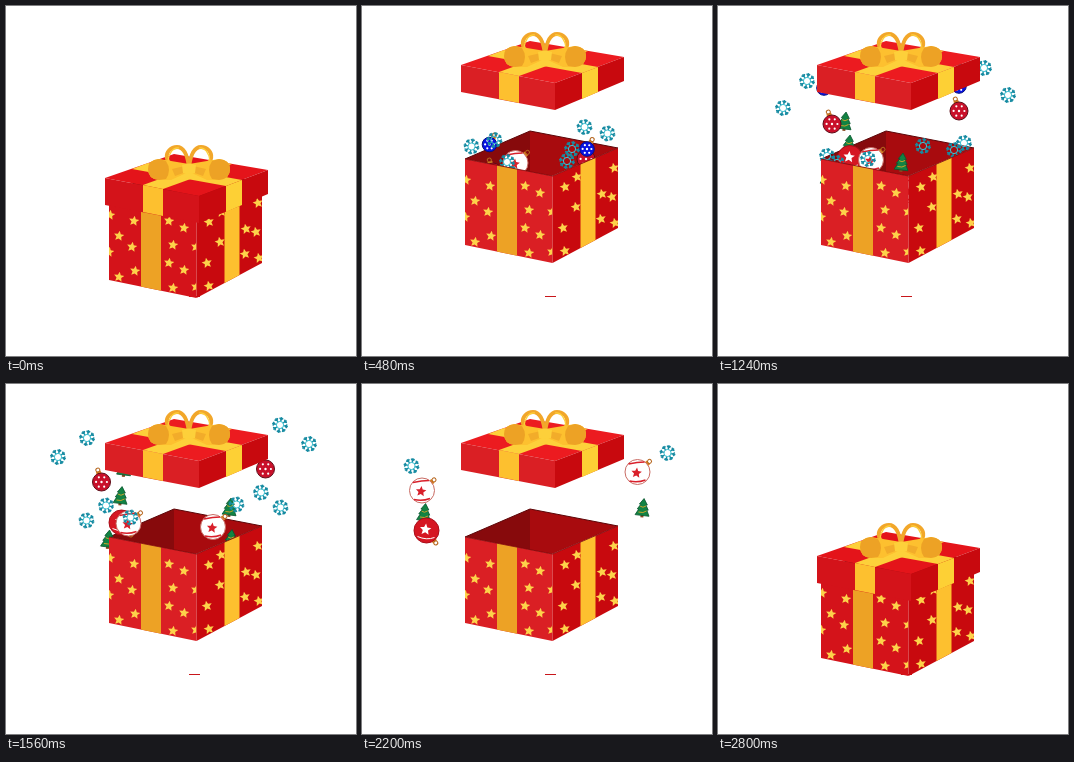
Animation, 350 px wide and 350 px high, one loop 2.84 s. Source, as an HTML page with a canvas:

```html
<!DOCTYPE html>
<html>
<head>
<meta charset="utf-8">
<style>
html, body { margin: 0; width: 350px; height: 350px; overflow: hidden; background: #fff; }
canvas { display: block; }
</style>
</head>
<body>
<canvas id="stage" width="350" height="350"></canvas>
<script>
const ctx = document.getElementById('stage').getContext('2d');
const LOOP = 2840, STEP = 40;
const KEYS = [200, 760, 1240, 1880, 2520];
const GOLD = '#eda225', YELLOW = '#fdc02f', BRIGHT = '#fdd03a';
const clamp = v => Math.max(0, Math.min(1, v));

function poly(color, ...p) {
  ctx.fillStyle = color;
  ctx.beginPath();
  for (let i = 0; i < p.length; i += 2) ctx.lineTo(p[i], p[i + 1]);
  ctx.closePath();
  ctx.fill();
}

function path(d, fill, stroke, width = 1) {
  const p = new Path2D(d);
  if (fill) { ctx.fillStyle = fill; ctx.fill(p); }
  if (stroke) { ctx.strokeStyle = stroke; ctx.lineWidth = width; ctx.stroke(p); }
}

function disc(x, y, r, fill, stroke) {
  ctx.beginPath();
  ctx.arc(x, y, r, 0, 7);
  if (fill) { ctx.fillStyle = fill; ctx.fill(); }
  if (stroke) { ctx.strokeStyle = stroke; ctx.lineWidth = 1; ctx.stroke(); }
}

function star(x, y, r, color, tilt = 0.1) {
  const p = [];
  for (let i = 0; i < 10; i++) {
    const a = i * Math.PI / 5 - Math.PI / 2 + tilt, q = i % 2 ? r * 0.46 : r;
    p.push(x + q * Math.cos(a), y + q * Math.sin(a));
  }
  poly(color, ...p);
}

function cap(r, angle) {
  ctx.save();
  ctx.rotate(angle);
  ctx.fillStyle = '#d98324';
  ctx.fillRect(-2.5, -r - 2, 5, 3);
  disc(0, -r - 3.5, 2, null, '#b5651d');
  ctx.restore();
}

function dottedBall(r, color, edge, angle) {
  cap(r, angle);
  disc(0, 0, r, color, edge);
  for (let i = 0; i < 6; i++) {
    disc(r * 0.6 * Math.cos(i * 1.05), r * 0.6 * Math.sin(i * 1.05), 1.1, '#fff');
  }
  disc(0, 0, 1.2, '#fff');
}

const ornaments = {
  flake() {
    ctx.strokeStyle = '#168ba2';
    ctx.lineWidth = 1.4;
    ctx.beginPath();
    for (let i = 0; i < 8; i++) {
      const a = i * Math.PI / 4 + 0.2;
      const at = (r, d = 0) => [r * Math.cos(a + d), r * Math.sin(a + d)];
      ctx.moveTo(...at(3.2));
      ctx.lineTo(...at(8));
      ctx.moveTo(...at(7.4, -0.25));
      ctx.lineTo(...at(5.4));
      ctx.lineTo(...at(7.4, 0.25));
    }
    ctx.stroke();
    disc(0, 0, 3.6, null, '#43c3d3');
  },
  blue() { dottedBall(7.3, '#0812e2', '#06107e', 0.5); },
  red() { dottedBall(9, '#c9102a', '#5d0d18', -0.3); },
  white() {
    cap(12.5, 0.85);
    disc(0, 0, 12.5, '#fff', '#c96b63');
    path('M-9 -8 Q0 -10 7 -10 M-8 9 Q0 11 8 8', null, '#d9202b', 1.4);
    star(-1, 1, 5.5, '#d9202b');
  },
  starred() {
    cap(12, 2.5);
    disc(0, 0, 12.5, '#d51622', '#a90c18');
    star(-1, -1, 6, '#fff');
    path('M-9 6 Q0 10 8 7', null, '#fff', 1);
  },
  tree() {
    ctx.rotate(0.12);
    ctx.fillStyle = '#8b4a22';
    ctx.fillRect(-1.5, 7, 3, 3);
    path('M0 -9 L4 -3 L2.5 -3 L5.5 2 L4 2 L7 8 L-7 8 L-4 2 L-5.5 2 L-2.5 -3 L-4 -3Z', '#118343', '#0b5730', 0.8);
    path('M-3 -1 Q0 1 3 -2 M-4 5 Q1 6 4 3', null, '#d5a52b', 0.9);
  }
};

// kind, mirrored, first key, then x and y at successive keys
const flights = [
  ['tree', 0, 1, 135, 165, 127, 115, 110, 51],
  ['tree', 0, 2, 131, 138, 99, 85],
  ['tree', 0, 2, 110, 170, 95, 140, 30, 117],
  ['tree', 0, 2, 184, 156, 264, 90],
  ['tree', 0, 2, 205, 176, 245, 133, 317, 114],
  ['starred', 0, 2, 132, 152, 99, 125, 30, 168],
  ['red', 1, 1, 131, 151, 114, 118, 77, 78],
  ['white', 0, 0, 154, 160, 153, 154, 153, 154, 92, 125, 28, 88],
  ['white', 0, 2, 190, 184, 224, 102, 327, 74],
  ['blue', 0, 0, 139, 159, 116, 118, 106, 82],
  ['blue', 0, 1, 225, 128, 241, 80],
  ['flake', 1, 0, 123, 159, 96, 122, 65, 102, 39, 44],
  ['flake', 1, 0, 144, 160, 121, 108, 89, 75, 73, 33],
  ['flake', 1, 1, 145, 141, 118, 74],
  ['flake', 1, 1, 150, 153, 150, 153, 99, 114],
  ['flake', 1, 2, 119, 157, 81, 86],
  ['flake', 1, 2, 109, 150, 52, 123, 47, 41]
];

function drawFlight([kind, mirrored, first, ...xy], t) {
  if (first) {
    xy.unshift(xy[0], xy[1] + 30);
    first--;
  }
  const count = xy.length / 2, last = KEYS[first + count - 1];
  const alpha = 1 - clamp((t - last) / 180);
  if (t < (first ? KEYS[first] : STEP) || alpha <= 0) return;
  let i = 0;
  while (i < count - 2 && t > KEYS[first + i + 1]) i++;
  const from = KEYS[first + i];
  const u = Math.max(0, (t - from) / (KEYS[first + i + 1] - from));
  const x = xy[2 * i] + u * (xy[2 * i + 2] - xy[2 * i]);
  const y = xy[2 * i + 1] + u * (xy[2 * i + 3] - xy[2 * i + 1]) + Math.max(0, 200 - t) * 0.175;
  const place = (px, py) => {
    ctx.save();
    ctx.globalAlpha = alpha;
    ctx.translate(px, py);
    ornaments[kind]();
    ctx.restore();
  };
  place(x, y);
  if (mirrored) place(355 - x, y - 13);
}

const frontStars = [104, 174, 128, 180, 113, 195, 103, 211, 126, 206, 113, 236, 129, 230,
  163, 180, 178, 187, 167, 204, 190, 206, 178, 229, 163, 222, 167, 247, 190, 246];
const sideStars = [203, 181, 215, 171, 201, 222, 214, 201, 203, 245, 240, 188, 252, 162,
  250, 191, 239, 213, 253, 217];

function drawStars(list, tilt) {
  for (let i = 0; i < list.length; i += 2) star(list[i], list[i + 1], 5.4, '#fdd24a', tilt);
}

function face(color, corners, ribbon, ribbonColor, stars, tilt) {
  ctx.save();
  poly(color, ...corners);
  ctx.clip();
  drawStars(stars, tilt);
  poly(ribbonColor, ...ribbon);
  ctx.restore();
}

function drawInside() {
  poly('#870a0c', 103, 153, 168, 125, 168, 166);
  poly('#a80b0e', 168, 125, 256, 142, 190, 170, 168, 166);
  path('M103 153 L168 125 L256 142', null, '#5c0608');
}

function drawFront(open) {
  face(open ? '#da1f24' : '#d4131a', [103, 153, 190.5, 170, 190.5, 257, 103, 239],
    [135, 150, 155, 150, 155, 260, 135, 260], GOLD, frontStars, 0.15);
  face('#c8090e', [190.5, 170, 256, 142, 256, 222, 190.5, 257],
    [218.5, 140, 233.5, 140, 233.5, 250, 218.5, 250], YELLOW, sideStars, -0.2);
  if (open) path('M103 153 L190.5 170 L256 142', null, '#7d080b', 0.8);
}

function drawBow() {
  for (const side of [1, -1]) {
    ctx.save();
    ctx.translate(183, 0);
    ctx.scale(side, 1);
    path('M-1 50 C-30 49 -25 28 -12 28 C-4 28 -1 40 0 49', null, '#f2a72a', 3.8);
    path('M-21 42 C-20 34 -16 28 -10 29', null, BRIGHT, 1.2);
    path('M0 45 L-30 40 Q-41 41 -41 50 Q-41 60 -30 61 L-18 61 L4 51Z', YELLOW);
    path('M-23 42 L-30 40 Q-41 41 -41 50 Q-41 60 -30 61 L-23 60 Q-17 51 -23 42Z', GOLD);
    path('M-17 50 L0 46 L0 52 L-14 57Z', '#f2ac2a');
    ctx.restore();
  }
  path('M176 46 Q183 43 190 46 L189 54 Q183 56 177 54Z', BRIGHT);
}

function drawLid(open) {
  poly(open ? '#ec1b20' : '#e4141a', 99, 59, 168, 35, 262, 51, 193, 77);
  poly(open ? '#da1f24' : '#d4131a', 99, 59, 193, 77, 193, 104, 99, 86);
  poly('#c8090e', 193, 77, 262, 51, 262, 75, 193, 104);
  poly(BRIGHT, 137, 66, 157, 70, 226, 45, 206, 41);
  poly(BRIGHT, 220, 67, 236, 61, 142, 44, 126, 50);
  poly(YELLOW, 137, 66, 157, 70, 157, 97, 137, 93);
  poly('#fdd035', 220, 67, 236, 61, 236, 86, 220, 93);
  drawBow();
}

function shifted(dy, draw, open) {
  ctx.save();
  ctx.translate(0, dy);
  draw(open);
  ctx.restore();
}

function render(t) {
  const closing = clamp((2800 - t) / 240);
  const drop = 35 * (1 - Math.min(clamp((t - 40) / 200), closing));
  const gap = 78 * (1 - Math.min(clamp(t / 160), closing));
  const open = gap < 78;
  ctx.fillStyle = '#fff';
  ctx.fillRect(0, 0, 350, 350);
  ctx.fillStyle = '#c8161b';
  ctx.fillRect(183, 290, 11, 1);
  shifted(drop, drawInside);
  flights.forEach(f => drawFlight(f, t));
  shifted(drop, drawFront, open);
  shifted(drop + gap, drawLid, open);
}

function tick(now) {
  render(Math.floor(now % LOOP / STEP) * STEP);
  requestAnimationFrame(tick);
}
render(0);
requestAnimationFrame(tick);
</script>
</body>
</html>
```
